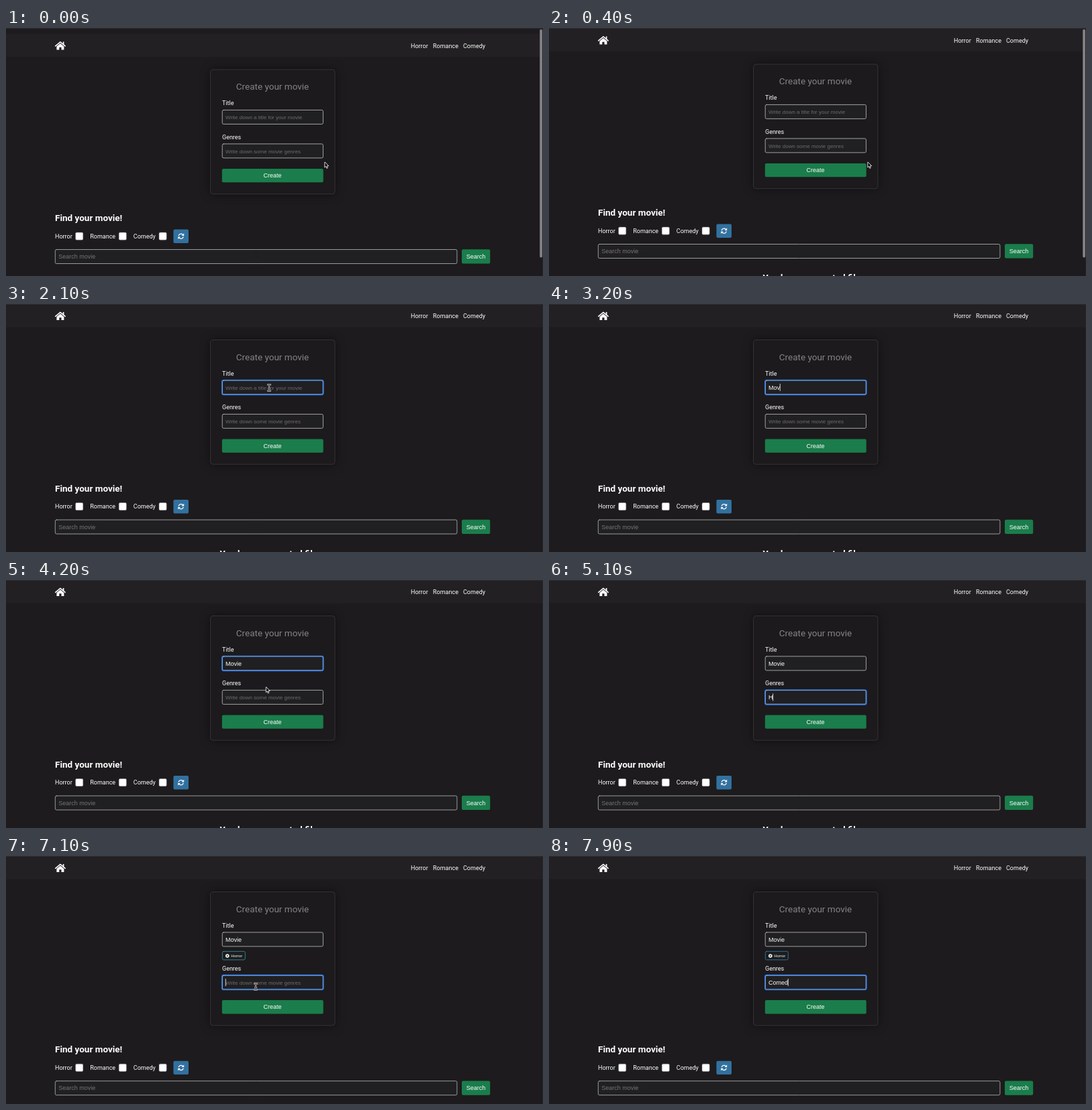
Recreate the animation shown at these times as an HTML page with a canvas. Size 800 px wide and 370 px high, loop 8 s.

```html
<!DOCTYPE html>
<html lang="en">
<head>
<meta charset="utf-8">
<title>Create your movie</title>
<style>
  html, body { margin: 0; width: 100%; height: 100%; overflow: hidden; background: #1d1b1d; }
  canvas { display: block; width: 800px; height: 370px; }
</style>
</head>
<body>
<canvas id="stage"></canvas>
<script>
const W = 800, H = 370, LOOP = 8000, TICK = 100;
const canvas = document.getElementById('stage');
const ctx = canvas.getContext('2d');
const dpr = window.devicePixelRatio || 1;
canvas.width = W * dpr;
canvas.height = H * dpr;

const ROBOTO = 'Roboto, sans-serif';
const ARIAL = '"Liberation Sans", Arial, sans-serif';
const GREEN = '#1a7d4b';
const CHIP_AT = 6100, CHIP_SHIFT = 13.7;
const TITLE_FOCUS = 1500, GENRE_FOCUS = 4700;

const words = {
  movie: { text: 'Movie', start: 2700, step: 200 },
  horror: { text: 'Horror', start: 5050, step: 150 },
  comedy: { text: 'Comedy', start: 7500, step: 100 }
};

// Pointer stops: time, x, y
const path = [
  [0, 474.5, 199.8], [1000, 474.5, 199.8], [1400, 392, 125], [3700, 392, 125],
  [4200, 387, 159.4], [4600, 372, 179], [6600, 372, 179], [7000, 372, 195]
];
const pointerHidden = [[2700, 3700], [5050, 6600], [7500, LOOP]];

function text(str, x, y, size, color = '#fff', family = ROBOTO, weight = 400, align = 'left') {
  ctx.font = `${weight} ${size}px ${family}`;
  ctx.textAlign = align;
  ctx.fillStyle = color;
  ctx.fillText(str, x, y);
}

function box(x, y, w, h, r, fill, stroke, line = 1) {
  ctx.beginPath();
  ctx.roundRect(x, y, w, h, r);
  if (fill) { ctx.fillStyle = fill; ctx.fill(); }
  if (stroke) { ctx.strokeStyle = stroke; ctx.lineWidth = line; ctx.stroke(); }
}

function poly(points, close = true) {
  ctx.beginPath();
  points.forEach(([x, y]) => ctx.lineTo(x, y));
  if (close) ctx.closePath();
}

function typedCount(word, t) {
  if (t < word.start) return 0;
  return Math.min(word.text.length, Math.floor((t - word.start) / word.step) + 1);
}

function field(y, hint, word, t, focusAt, focused) {
  const n = typedCount(word, t);
  const value = word.text.slice(0, n);
  box(322.2, y, 150.2, 21, 2, '#201f21', focused ? null : '#b2b2b2', 0.9);
  if (focused) {
    box(321.9, y - 0.3, 150.8, 21.6, 2.5, null, '#2f72d8', 1.9);
    box(322.5, y + 0.3, 149.6, 20.4, 2, null, 'rgba(205,224,250,.7)', 0.6);
  }
  if (n) text(value, 327, y + 13.8, 9, '#fff', ARIAL);
  else text(hint, 327, y + 13.6, 8, '#6d6c6d', ARIAL);
  const lastKey = n ? word.start + (n - 1) * word.step : focusAt;
  if (focused && (t - lastKey) % 1000 < 500) {
    const x = 327 + (n ? ctx.measureText(value).width : 0);
    ctx.fillStyle = '#fff';
    ctx.fillRect(x - 0.2, y + 5, 0.8, 11);
  }
}

function home() {
  ctx.fillStyle = ctx.strokeStyle = '#fff';
  ctx.lineWidth = 1.5;
  ctx.lineCap = ctx.lineJoin = 'round';
  poly([[73.7, 18.4], [80.9, 12.4], [88.1, 18.4]], false);
  ctx.stroke();
  poly([[75.4, 18.9], [80.9, 14.4], [86.4, 18.9], [86.4, 24], [82.5, 24],
    [82.5, 20.3], [79.3, 20.3], [79.3, 24], [75.4, 24]]);
  ctx.fill();
  ctx.fillRect(84.7, 12, 1.7, 4);
}

function nav() {
  ctx.fillStyle = '#222022';
  ctx.fillRect(0, 0, W, 34.7);
  home();
  text('Horror', 603, 21.2, 9);
  text('Romance', 636, 21.2, 9);
  text('Comedy', 681, 21.2, 9);
}

function chip(t) {
  box(322.3, 142.3, 34, 12.6, 2, '#1d1c1e', t < 7500 ? '#2f8c9b' : '#2f79a6', 0.9);
  ctx.fillStyle = '#fff';
  ctx.beginPath();
  ctx.arc(329.8, 149, 2.8, 0, 7);
  ctx.fill();
  ctx.strokeStyle = '#1d1c1e';
  ctx.lineWidth = 0.8;
  for (const d of [-1, 1]) {
    poly([[328.8, 149 - d], [330.8, 149 + d]], false);
    ctx.stroke();
  }
  text('Horror', 335.2, 151, 6, '#fff', ARIAL);
}

function card(t, shift) {
  ctx.save();
  ctx.shadowColor = 'rgba(0,0,0,.5)';
  ctx.shadowBlur = 14 * dpr;
  box(304.5, 53.5, 185.5, 185.7 + shift, 4, '#1c1a1c');
  ctx.restore();
  box(304.5, 53.5, 185.5, 185.7 + shift, 4, null, '#383638', 0.9);
  text('Create your movie', 397, 83.8, 13.5, '#858485', ROBOTO, 400, 'center');
  text('Title', 322, 106.9, 9);
  field(113.9, 'Write down a title for your movie', words.movie, t, TITLE_FOCUS,
    t >= TITLE_FOCUS && t < GENRE_FOCUS);
  if (shift) chip(t);

  ctx.save();
  ctx.translate(0, shift);
  text('Genres', 322, 157.2, 9);
  field(164.4, 'Write down some movie genres', shift ? words.comedy : words.horror, t,
    shift ? CHIP_AT : GENRE_FOCUS, t >= GENRE_FOCUS);
  box(321.8, 201.4, 150.9, 20.4, 2, GREEN);
  text('Create', 397, 214.7, 9, '#fff', ARIAL, 400, 'center');
  ctx.restore();
}

function refreshIcon(x, y) {
  ctx.save();
  ctx.translate(x, y);
  ctx.strokeStyle = ctx.fillStyle = '#fff';
  ctx.lineWidth = 1.3;
  ctx.lineCap = 'butt';
  for (let i = 0; i < 2; i++) {
    ctx.beginPath();
    ctx.arc(0, 0, 3.6, Math.PI * 1.06, Math.PI * 1.8);
    ctx.stroke();
    poly([[4.5, -4.4], [4.5, -0.8], [0.9, -0.8]]);
    ctx.fill();
    ctx.rotate(Math.PI);
  }
  ctx.restore();
}

function finder() {
  text('Find your movie!', 73, 279.6, 13.5, '#fff', ROBOTO, 700);
  [['Horror', 73, 103.6], ['Romance', 125.2, 168.2], ['Comedy', 189.8, 228]].forEach(([name, x, check]) => {
    text(name, x, 305.3, 9);
    box(check, 296.5, 11.2, 11.2, 1.6, '#fff', '#77767a', 0.5);
  });
  box(249.4, 292, 22.6, 20.4, 2, '#32719f');
  refreshIcon(260.7, 302.2);
  box(73.3, 322, 598.6, 21, 2, '#201f21', '#a9a9a9', 0.9);
  text('Search movie', 78.2, 335.7, 9, '#757475', ARIAL);
  box(679, 321.7, 42.2, 21.4, 2, GREEN);
  text('Search', 700, 335.6, 9, '#fff', ARIAL, 400, 'center');
  text('You have no created films', 397, 376.8, 13.5, '#fff', ROBOTO, 700, 'center');
}

function pointerAt(t) {
  let i = path.length - 1;
  while (path[i][0] > t) i--;
  const a = path[i], b = path[i + 1];
  if (!b) return [a[1], a[2]];
  const u = (t - a[0]) / (b[0] - a[0]);
  const k = u * u * (3 - 2 * u);
  return [a[1] + (b[1] - a[1]) * k, a[2] + (b[2] - a[2]) * k];
}

function pointer(t, shift) {
  if (pointerHidden.some(([from, to]) => t >= from && t < to)) return;
  const [x, y] = pointerAt(t);
  const over = top => x > 322 && x < 473 && y > top && y < top + 22;
  ctx.save();
  ctx.translate(x, y);
  ctx.lineCap = ctx.lineJoin = 'round';
  if (over(113.5) || over(164 + shift)) {
    for (const [color, line] of [['#e4e4e4', 2.2], ['#111', 0.9]]) {
      ctx.strokeStyle = color;
      ctx.lineWidth = line;
      ctx.beginPath();
      for (const d of [-1, 1]) {
        ctx.moveTo(-2, 4.6 * d);
        ctx.quadraticCurveTo(0, 4.6 * d, 0, 3.2 * d);
        ctx.quadraticCurveTo(0, 4.6 * d, 2, 4.6 * d);
      }
      ctx.moveTo(0, -3.2);
      ctx.lineTo(0, 3.2);
      ctx.moveTo(-1, 1);
      ctx.lineTo(1, 1);
      ctx.stroke();
    }
  } else {
    poly([[0.3, 0.3], [0.3, 8.2], [2.1, 6.6], [3.4, 9.6], [4.7, 9], [3.5, 6.2], [5.8, 6]]);
    ctx.fillStyle = '#0c0c0c';
    ctx.fill();
    ctx.strokeStyle = '#eee';
    ctx.lineWidth = 0.9;
    ctx.stroke();
  }
  ctx.restore();
}

function windowEdges(t) {
  ctx.fillStyle = '#343235';
  ctx.fillRect(0, 0, W, 0.8);
  ctx.fillStyle = '#2a282b';
  ctx.fillRect(W - 0.7, 0, 0.7, H);
  const alpha = Math.max(0, Math.min(1, (900 - t) / 300));
  if (alpha) {
    ctx.globalAlpha = alpha;
    box(795.2, 2, 3.7, 340.5, 1.8, '#858386');
    ctx.globalAlpha = 1;
  }
}

function draw(t) {
  const shift = t >= CHIP_AT ? CHIP_SHIFT : 0;
  // Overscroll springs back in half-pixel steps
  const bounce = t < 1000 ? Math.ceil(17 * Math.exp(-t / 140)) / 2 : 0;
  ctx.setTransform(dpr, 0, 0, dpr, 0, 0);
  ctx.fillStyle = '#1d1b1d';
  ctx.fillRect(0, 0, W, H);
  ctx.save();
  ctx.translate(0, bounce);
  nav();
  card(t, shift);
  ctx.translate(0, shift);
  finder();
  ctx.restore();
  windowEdges(t);
  pointer(t, shift);
}

const begin = performance.now();
function loop() {
  const t = (performance.now() - begin) % LOOP;
  draw(Math.floor(t / TICK) * TICK);
  requestAnimationFrame(loop);
}
loop();
</script>
</body>
</html>
```
